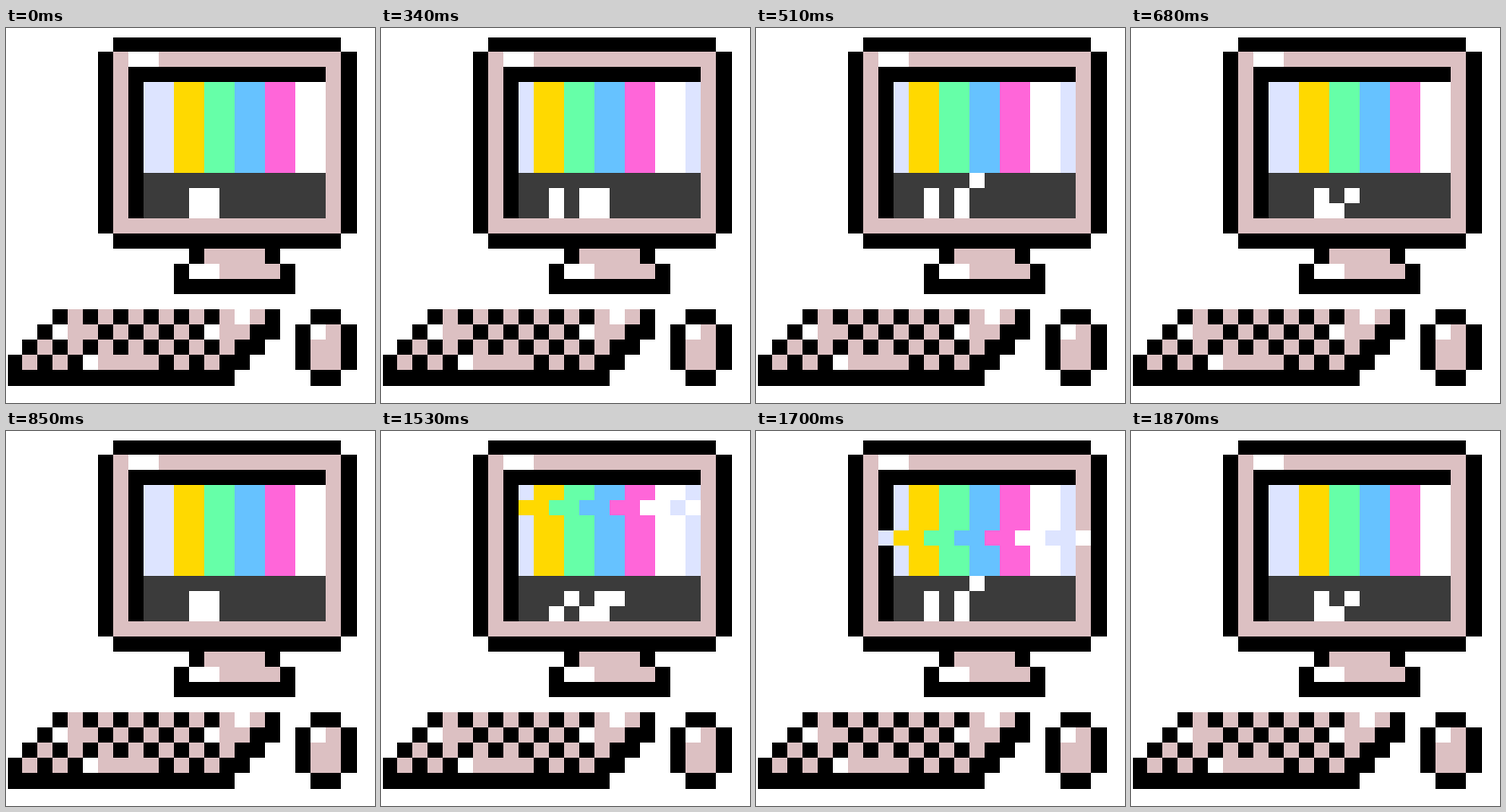
Animation, 389 px wide and 396 px high, one loop 2.04 s. Source, as an HTML page with a canvas:

```html
<!DOCTYPE html>
<html lang="en">
<head>
<meta charset="utf-8">
<title>Pixel computer</title>
<style>
html, body { margin: 0; width: 100%; height: 100%; overflow: hidden; background: #fff; }
canvas { display: block; }
</style>
</head>
<body>
<canvas id="stage" width="389" height="396"></canvas>
<script>
const ctx = document.getElementById('stage').getContext('2d');
const INK = '#000', CASE = '#dcc0c2', LIGHT = '#fff', DARK = '#3b3b3b';
const BARS = ['#dde4ff', '#ffd900', '#66ffa8', '#66c2ff', '#ff66d9', LIGHT];
const CELL = 16, LAST = 23, LOOP = 2040;

// Cell edges; the outermost ones sit one pixel further in or out.
const nudge = n => (n === 0 || n === LAST ? 1 : 0);
const px = n => 1 + n * CELL + nudge(n);
const py = n => 9 + n * CELL + nudge(n);

function box(color, x, y, w = 1, h = 1) {
  ctx.fillStyle = color;
  ctx.fillRect(px(x), py(y), px(x + w) - px(x), py(y + h) - py(y));
}

function monitor() {
  box(INK, 7, 0, 15);
  box(INK, 6, 1, 17, 12);
  box(INK, 7, 13, 15);
  box(CASE, 7, 1, 15, 12);
  box(LIGHT, 8, 1, 2);
  box(INK, 8, 2, 13, 10);
  box(INK, 12, 14, 6);
  box(CASE, 13, 14, 4);
  box(INK, 11, 15, 8, 2);
  box(CASE, 14, 15, 4);
  box(LIGHT, 12, 15, 2);
}

function keyboard() {
  for (let r = 0; r < 4; r++) {
    const left = 3 - r, y = 18 + r;
    box(CASE, left, y, 14);
    for (let x = left; x <= 13; x += 2) box(INK, x, y);
    if (r) box(INK, 17 - r, y, 2);
    else box(INK, 17, y);
  }
  box(INK, 0, 22, 15);
  box(CASE, 4, 19);
  box(CASE, 6, 21, 4);
  box(LIGHT, 3, 19);
  box(LIGHT, 13, 19);
  box(LIGHT, 15, 18);
  box(LIGHT, 5, 21);
}

function mouse() {
  box(INK, 20, 18, 2);
  box(INK, 19, 19, 4, 3);
  box(INK, 20, 22, 2);
  box(CASE, 20, 19, 2, 3);
  box(LIGHT, 20, 19);
}

function bars(shift, y, h, from = 0, to = 12) {
  for (let i = from; i < to; i++) {
    box(BARS[((i + shift) >> 1) % 6], 9 + i, y, 1, h);
  }
}

// One row of the bars slips sideways.
function slip() {
  bars(2, 4, 1);
  box(LIGHT, 20, 4);
}

// The slipped row spills over both sides of the screen.
function spill() {
  bars(2, 6, 1, -1, 13);
  box(BARS[0], 8, 6);
  box(LIGHT, 21, 6);
}

const block = [[12, 10, 2, 2]];
const hop = [[12, 10, 1, 2], [13, 11], [14, 10]];
const split = [[11, 10, 1, 2], [13, 10, 2, 2]];
const lift = [[11, 10, 1, 2], [13, 10, 1, 2], [14, 9]];
const scatter = [[12, 10], [14, 10, 2], [11, 11], [13, 11, 2]];

const steps = [
  { at: 0, shift: 0, marks: block },
  { at: 340, shift: 1, marks: split },
  { at: 510, shift: 1, marks: lift },
  { at: 680, shift: 0, marks: hop },
  { at: 850, shift: 0, marks: block },
  { at: 1530, shift: 1, marks: scatter, glitch: slip },
  { at: 1700, shift: 1, marks: lift, glitch: spill },
  { at: 1870, shift: 0, marks: hop }
];

function draw({ shift, marks, glitch }) {
  ctx.fillStyle = LIGHT;
  ctx.fillRect(0, 0, 389, 396);
  monitor();
  keyboard();
  mouse();
  bars(shift, 3, 6);
  box(DARK, 9, 9, 12, 3);
  for (const mark of marks) box(LIGHT, ...mark);
  if (glitch) glitch();
}

const start = performance.now();
let shown = null;

function tick() {
  const t = (performance.now() - start) % LOOP;
  const step = steps.filter(s => s.at <= t).pop();
  if (step !== shown) draw(shown = step);
  requestAnimationFrame(tick);
}
tick();
</script>
</body>
</html>
```
